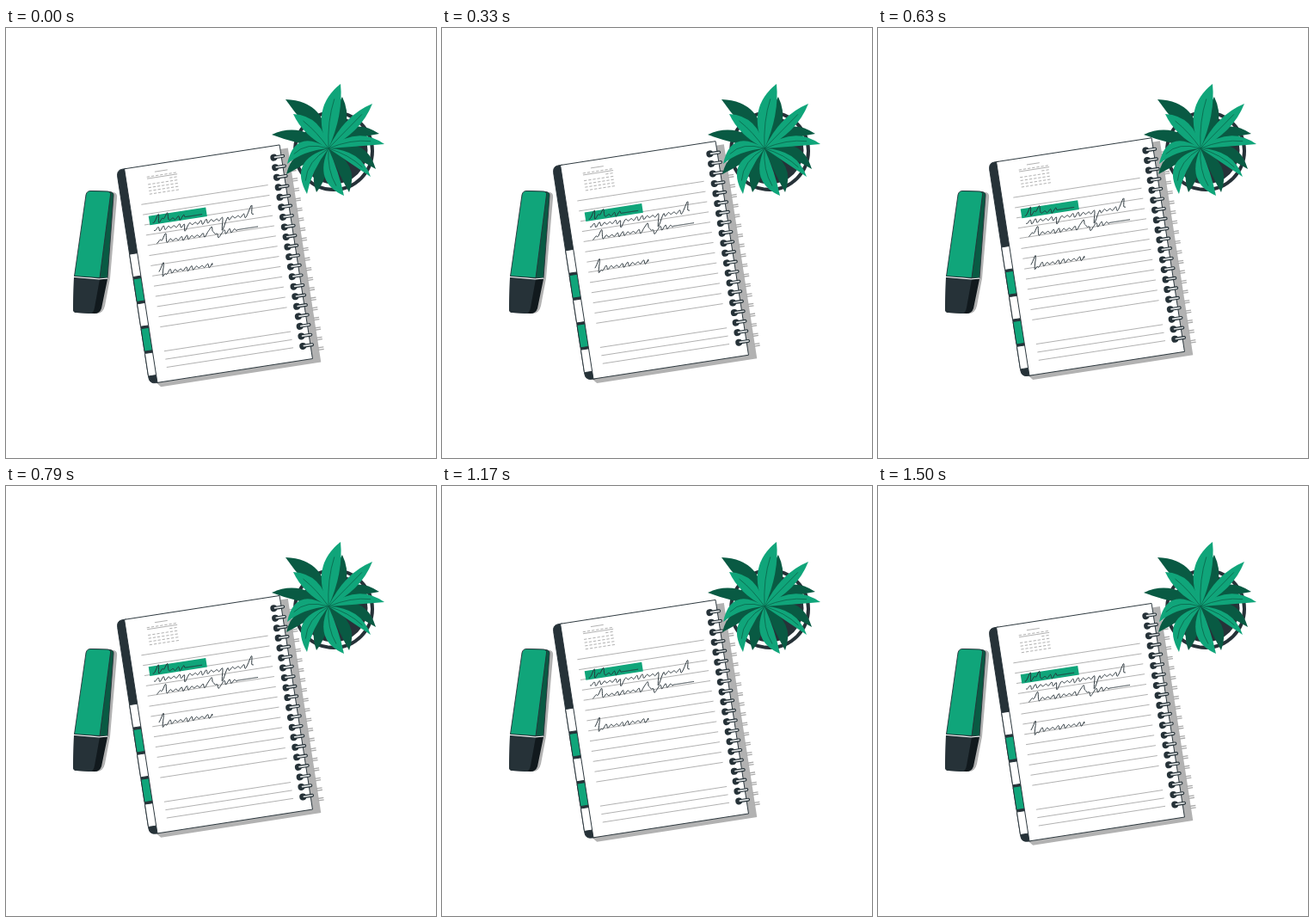
An HTML page for the animation above (1.54 s loop, 500 by 500 pixels).

```html
<!DOCTYPE html>
<html lang="en">
<head>
<meta charset="utf-8">
<title>Floating notebook</title>
<style>
  html, body { margin: 0; width: 100%; height: 100%; overflow: hidden; background: #fff; }
  svg { display: block; width: 100vw; height: 100vh; }
  .ink { fill: none; stroke: #263238; stroke-width: .9; stroke-linecap: round; stroke-linejoin: round; }
  .edge { stroke: #263238; stroke-width: .9; stroke-linejoin: round; }
  .rule { fill: none; stroke: #a9a9a9; stroke-width: .85; }
  .shade { fill: #b2b2b2; }
  .dark { fill: #263238; }
  .green { fill: #10a57a; }
  .deep { fill: #095a43; }
  .vein { fill: none; stroke: #095a43; stroke-width: .7; stroke-linecap: round; }
</style>
</head>
<body>
<svg viewBox="0 0 500 500">
  <g id="marker">
    <path class="shade" d="M124 191 Q130 191 129 198 L121 291 L115 323 Q113 332 105 332 H98Z"/>
    <path class="deep edge" d="M98 189.500 L121 190.500 Q125.500 191 125 195 L118 291 L80 289Z"/>
    <path class="green edge" d="M98 189.500 L118 190 Q122 190.500 121.500 194 L109 290.500 L79.500 288.500 L93 194 Q94 189.500 98 189.500Z"/>
    <path d="M79 290 L118 292 L111 326 Q109 332 103 332 L82 331 Q78 331 78 327Z" fill="#11191d"/>
    <path class="dark" d="M79 290 L109 292 L103 325 Q102 332 97 332 L82 331 Q78 331 78 327Z"/>
    <path d="M80 289.500 L108.500 292 L118 291" fill="none" stroke="#fff"/>
  </g>

  <g id="notebook">
    <g transform="translate(138 164) rotate(-8.780)">
      <path class="shade" d="M-3 250 L3 257 H191.300 V5 H180Z"/>
      <g id="ringShadows"></g>
      <path class="dark edge" d="M2 0 H-3 Q-9.600 0 -9.600 8 V244 Q-9.600 251.500 -2 251.500 H2Z"/>
      <g id="tabs"></g>
      <path class="edge" d="M-.4 0 H182.200 V251.500 H-.4Z" fill="#fff"/>
      <g id="rules"></g>
      <path class="green" d="M19 58.500 H86.300 V69.300 H19Z"/>
      <g id="writing"></g>
      <g id="rings"></g>
    </g>
  </g>

  <g id="plant">
    <circle cx="381" cy="143" r="45" fill="#fff" stroke="#263238" stroke-width="4"/>
    <circle class="dark" cx="381" cy="142" r="39.500"/>
    <g id="leaves"></g>
  </g>
</svg>
<script>
const byId = id => document.getElementById(id);
const repeat = (n, draw) => Array.from({ length: n }, (_, i) => draw(i)).join('');
const path = (cls, d, extra = '') => `<path class="${cls}" d="${d}" ${extra}/>`;

const rule = (x, y, end, extra) => path('rule', `M${x} ${y}H${end}`, extra);
const dashes = (x, y) => rule(x, y, 59, 'stroke-dasharray="3.3 1.9"');
byId('rules').innerHTML =
  repeat(13, i => rule(12.8, 44 + 12 * i, 161.8)) +
  repeat(3, i => rule(13, 216.5 + 9.5 * i, 162)) +
  rule(34, 8.7, 49) + dashes(24, 13.3) + rule(24, 15.3, 59.5) + dashes(50, 18.3) +
  repeat(4, i => dashes(24, 22.1 + 3.8 * i));

byId('tabs').innerHTML = repeat(5, i =>
  `<rect class="edge ${i % 2 ? 'green' : ''}" x="-9.6" y="${99 + 29.2 * i}" width="10" height="26.8" rx="1" fill="#fff"/>`);

const ringY = i => 13.5 + 11.68 * i;
byId('rings').innerHTML = repeat(20, i => {
  const bar = `M174.5 ${ringY(i) - .1}H184.3`;
  return `<circle class="dark" cx="173.3" cy="${ringY(i)}" r="4"/>` +
    path('ink', bar, 'style="stroke-width:4"') +
    path('ink', bar, 'style="stroke:#dfe2e3;stroke-width:1.7"');
});
byId('ringShadows').innerHTML = repeat(20, i =>
  path('rule', `M190 ${ringY(i) + 4.6}h7m-7 2.4h7`, 'style="stroke-width:1.3"'));

// Cursive: slanted humps along a line; each stem is a tall (or hanging) stroke [x, height].
function scribble(from, humpsEnd, end, baseline, stems) {
  let d = '';
  for (let x = from; x <= end; x += .5) {
    const hump = x < humpsEnd ? 1.8 * Math.sin(x) * (1 + .5 * Math.sin(x / 4)) : 0;
    const lift = stems.reduce((sum, [at, h]) => sum + h * Math.exp(-(((x - at) / 1.9) ** 2)), 1.5 + hump);
    d += `${d ? 'L' : 'M'}${(x + lift * .4).toFixed(1)} ${(baseline - lift).toFixed(1)}`;
  }
  return path('ink', d);
}
byId('writing').innerHTML =
  scribble(23, 60, 80, 67.5, [[27, 6], [37, 9]]) +
  scribble(23, 139, 139, 76.5, [[60, -6], [106, -11], [135, 10]]) +
  scribble(24, 118, 142, 91.5, [[31, 9], [86, 10], [97, -6]]) +
  scribble(20, 83, 83, 127.5, [[23, 13], [26, -7]]);

// A leaf grows from the heart to (x, y); bend bows it clockwise, width spreads its sides.
const heart = [375, 140];
function leaf(cls, x, y, bend, width) {
  const [dx, dy] = [x - heart[0], y - heart[1]];
  const len = Math.hypot(dx, dy);
  const control = side => [heart[0] + .55 * dx - side * dy / len, heart[1] + .55 * dy + side * dx / len];
  const blade = path(cls, `M${heart} Q${control(bend - width)} ${x} ${y} Q${control(bend + width)} ${heart}Z`);
  return cls === 'deep' ? blade : blade + path('vein', `M${heart} Q${control(bend)} ${x} ${y}`,
    `pathLength="100" stroke-dasharray="75 100"`);
}
const grow = (cls, list) => list.map(shape => leaf(cls, ...shape)).join('');
byId('leaves').innerHTML = grow('deep', [
  [325, 83, 16, 20], [309, 124, 10, 14], [326, 170, 12, 14], [391, 80, 8, 16],
  [434, 123, -18, 14], [430, 164, -18, 14], [361, 191, 4, 14], [399, 191, -12, 14],
]) + grow('green', [
  [334, 100, 6, 16], [426, 88, 0, 14], [389, 65, -10, 20], [440, 135, -12, 12],
  [424, 173, -10, 10], [393, 195, 13, 16], [350, 193, 22, 15], [327, 158, 22, 14],
]);

// Linear rise and fall by 10 px.
const LOOP = 1540, LEAD = 48, RISE = 10;
const notebook = byId('notebook');
const start = performance.now();
function frame() {
  const phase = ((performance.now() - start + LEAD) % LOOP) / LOOP;
  const lift = RISE * (1 - Math.abs(2 * phase - 1));
  notebook.setAttribute('transform', `translate(0 ${(.4 - lift).toFixed(3)})`);
  requestAnimationFrame(frame);
}
frame();
</script>
</body>
</html>
```
